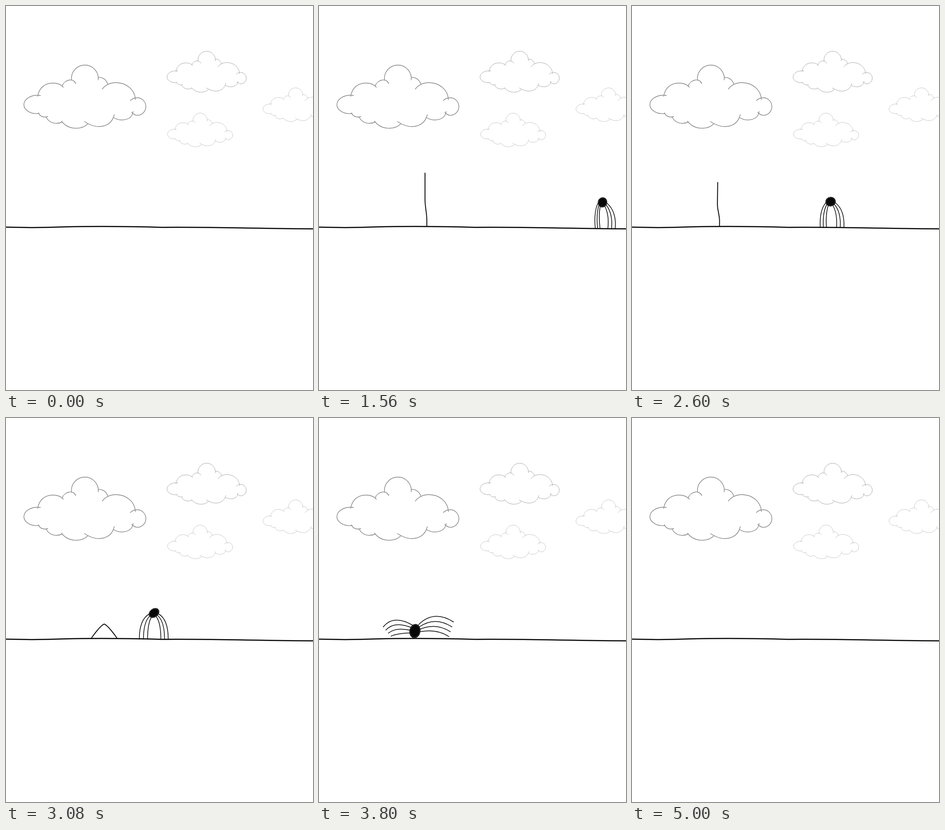
Recreate the animation shown at these times as an HTML page with a canvas. Size 669 by 837 pixels, loop 5.57 s.

```html
<!DOCTYPE html>
<html lang="en">
<head>
<meta charset="utf-8">
<title>Spider and stalk</title>
<style>
html, body { margin: 0; height: 100%; overflow: hidden; background: #fff; }
canvas { display: block; }
</style>
</head>
<body>
<canvas id="stage" width="669" height="837"></canvas>
<script>
const ctx = document.getElementById('stage').getContext('2d');
const LOOP = 5570, STEP = 80, INK = '#080808';
const mix = (a, b, k) => a + (b - a) * k;
const blend = (a, b, k) => a.map((v, i) => mix(v, b[i], k));
const ramp = (v, from, to) => Math.min(1, Math.max(0, (v - from) / (to - from)));
const smooth = k => k * k * (3 - 2 * k);
const wave = (t, peak, period) => 0.5 + 0.5 * Math.cos(2 * Math.PI * (t - peak) / period);

// Linear interpolation between [time, ...values] rows.
function sample(keys, t) {
  const i = Math.max(1, keys.findIndex(key => key[0] >= t));
  const [a, b] = [keys[i - 1], keys[i]];
  return blend(a, b, ramp(t, a[0], b[0])).slice(1);
}

const cloudLine = `M72 234 C55 237 39 227 39 215 S55 192 75 195
  M69 197 C72 178 85 168 102 168 C112 168 120 171 125 177
  M122 175 C127 160 147 156 152 169
  M142.8 162 A29.3 29.3 0 1 1 201 161
  M201 156 C209 154 219 160 222 171
  M210 181 C216 172 228 167 239 167 C262 167 281 182 282 204
  M271 206 C276 201 281 200 286 200 A18.8 19.2 0 0 1 286 238.4 C282 238 278 236 274 232
  M277 230 C275 249 250 253 234 243
  M236 237 C229 264 200 271 171 252
  M178 257 C165 270 136 271 121 251
  M122 253 C112 258 95 257 88 243
  M91 241 C82 244 73 240 71 233`;
const cloudEdge = new Path2D(cloudLine);
const cloudFill = new Path2D('M72 234' + cloudLine.replace(/M/g, 'L'));
const ground = new Path2D('M-2 482 Q65 484 125 481.5 C190 480 250 480 340 482.4 C430 481 520 485 671 485.8');

function drawCloud(x, y, scale, color, width) {
  ctx.save();
  ctx.translate(x, y);
  ctx.scale(scale, scale);
  ctx.fillStyle = '#fff';
  ctx.fill(cloudFill);
  ctx.strokeStyle = color;
  ctx.lineWidth = width / scale;
  ctx.stroke(cloudEdge);
  ctx.restore();
}

// Time, root x, height, lean of the tip.
const stalkKeys = [
  [40, 272, 0, 0], [520, 271, 95, 1], [1000, 247, 98, 12],
  [1400, 245, 119, -4], [2120, 200, 100, -4], [2840, 186, 95, -6], [LOOP, 186, 95, -6]
];

// Grows, walks, then folds into a small hill that is pressed flat.
function drawStalk(t) {
  if (t < 40 || t > 3600) return;
  const [root, height, lean] = sample(stalkKeys, t);
  const fold = smooth(ramp(t, 2560, 3000));
  const hill = 31 * (1 - ramp(t, 3400, 3640));
  ctx.beginPath();
  for (let u = 0; u <= 1; u += 1 / 16) {
    const up = [root + lean * smooth(ramp(u, 0.1, 0.5)), 479 - height * u];
    const arch = [root + 56 * u, 480 - hill * (1 - Math.abs(2 * u - 1) ** 1.3)];
    ctx.lineTo(...blend(up, arch, fold));
  }
  ctx.lineWidth = 1.9;
  ctx.stroke();
}

// Time, x, y of the body.
const bodyKeys = [
  [1080, 682, 428], [2120, 543, 428], [3080, 322.5, 425], [3320, 274, 425],
  [3720, 209, 464.5], [3960, 209, 464.5], [4360, 198.5, 375.5], [5000, 195, 216]
];

// Top and bottom leg of each side as joint, bend and tip; the others lie between.
const spread = {
  left: [[-5, -13, -47, -37, -69, -9], [-11, 4, -39, 5, -52, 11]],
  right: [[8, -14, 41, -47, 84, -20], [12, 1, 49, -5, 74, 12]]
};
const raised = {
  left: [[-5, -11, -23, -38, -48, -42], [-10, 13, -46, -14, -75, -3]],
  right: [[7, -15, 17, -38, 43, -59], [12, 5, 37, -30, 69, -32]]
};

// Three legs show per side while walking: the outer one is doubled.
function walkingLeg(side, n, stride, floor) {
  const inner = Math.max(0, n - 1);
  const foot = side === 'right'
    ? mix(27, 31, stride) - 8 * inner
    : mix(-13, -32, stride) + mix(4.5, 9, stride) * inner;
  const out = Math.sign(foot);
  return [out * (10 - 2.5 * inner), 2 + 3 * inner,
    foot + out * mix(4, 0, stride), mix(22, 14, stride) + 4 * inner, foot, floor];
}

function drawSpider(t) {
  if (t < 1080 || t >= 5000) return;
  const [x, y] = sample(bodyKeys, t);
  const stride = 1 - wave(t, 2120, 640);
  const settle = ramp(t, 3400, 3720);
  const flight = ramp(t, 3960, 4200);
  const lift = ramp(t, 3960, 4040) * wave(t, 4360, 320);
  const reach = 1 + 0.6 * ramp(t, 3800, 4600);
  const floor = 482 + 3 * ramp(x, 400, 550) - y;

  ctx.save();
  ctx.translate(x, y);
  ctx.lineWidth = 1.5;
  ctx.beginPath();
  for (const side of ['left', 'right']) {
    for (let n = 0; n < 4; n++) {
      const wide = blend(...spread[side], n / 3).map((v, i) => i === 2 || i === 4 ? v * reach : v);
      const grounded = blend(walkingLeg(side, n, stride, floor), wide, settle);
      const [jx, jy, ...curve] = blend(grounded, blend(...raised[side], n / 3), lift);
      ctx.moveTo(jx, jy);
      ctx.quadraticCurveTo(...curve);
    }
  }
  ctx.stroke();

  // Radii and tilt.
  const step = blend([10, 11.3, 0.4], [12.5, 9.5, -0.65], stride);
  const [rx, ry, tilt] = blend(blend(step, [12, 15.5, 0.2], settle), [11.5, 17, 0.1], flight);
  const oval = inset => {
    ctx.beginPath();
    ctx.ellipse(0, 0, rx - inset, ry - inset, tilt, 0, 2 * Math.PI);
  };
  ctx.fillStyle = INK;
  oval(0);
  ctx.fill();
  ctx.strokeStyle = '#777';
  ctx.lineWidth = 0.5;
  oval(1.4);
  ctx.stroke();
  ctx.restore();
}

function draw() {
  const time = performance.now() % LOOP;
  const t = time < 40 ? 0 : Math.min(5000, 40 + Math.floor((time - 40) / STEP) * STEP);
  ctx.fillStyle = '#fff';
  ctx.fillRect(0, 0, 669, 837);
  ctx.lineCap = ctx.lineJoin = 'round';
  ctx.strokeStyle = INK;
  drawSpider(t);
  drawCloud(0, 0, 1, '#888', 1.4);
  drawCloud(325.6, 14.8, 0.65, '#aaa', 1);
  drawCloud(331.2, 164.6, 0.534, '#c2c2c2', 0.9);
  drawCloud(539.2, 109.6, 0.534, '#c2c2c2', 0.9);
  drawStalk(t);
  ctx.lineWidth = 2.5;
  ctx.stroke(ground);
  requestAnimationFrame(draw);
}
draw();
</script>
</body>
</html>
```
